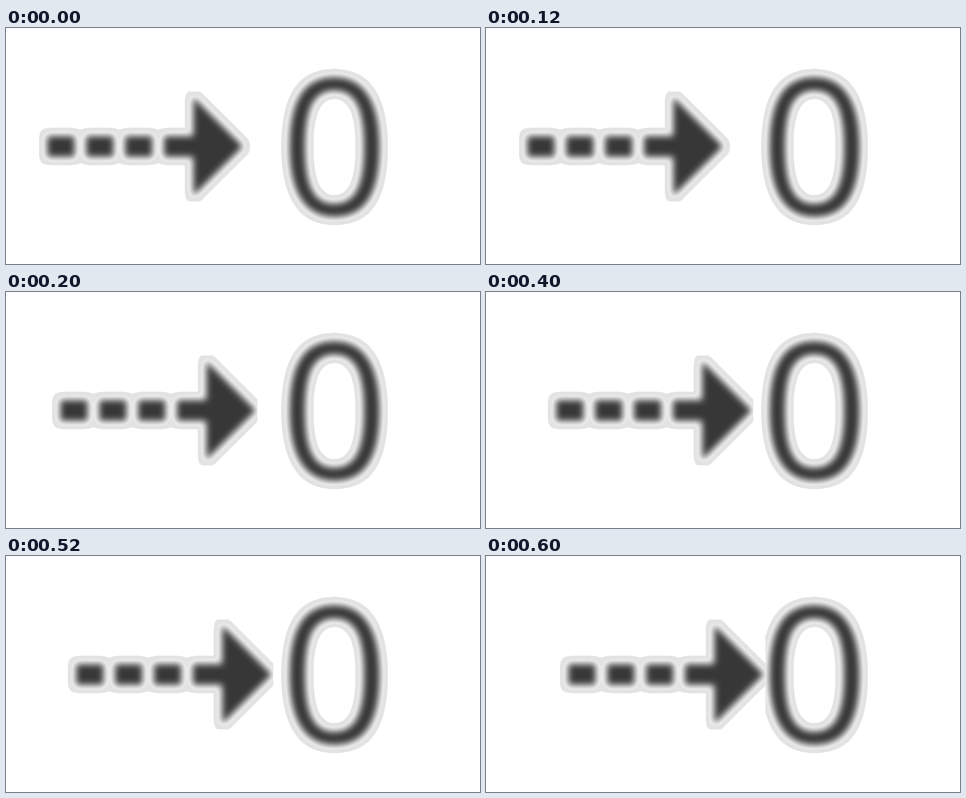
These frames come from a looping animation (1018 by 509 pixels, 800 ms). An HTML page with a canvas:

```html
<!DOCTYPE html>
<html lang="en">
<head>
<meta charset="utf-8">
<title>Arrow to zero</title>
<style>
  html, body { margin: 0; width: 100%; height: 100%; overflow: hidden; background: #fff; }
  canvas { display: block; }
</style>
</head>
<body>
<canvas id="stage" width="1018" height="509"></canvas>
<script>
const W = 1018, H = 509, STEP = 200;
const RADII = [7, 6, 7];
const EDGE = 0.0025, RIM = 0.07;
const HALO = 0xe3, GLOW = 0xe9, INK = 0x37;
const MID = 255.5;

// Arrow offset and right limit of each pose
const POSES = [
  { dx: 0, right: 540 },
  { dx: 28, right: 540 },
  { dx: 62, right: 574 },
  { dx: 88, right: 600 }
];

function makeCanvas() {
  const c = document.createElement('canvas');
  c.width = W;
  c.height = H;
  return c;
}

// Running-sum box blur of one row or column
function blurLine(src, dst, start, stride, count, r) {
  const at = i => (i < 0 || i >= count ? 0 : src[start + i * stride]);
  let sum = 0;
  for (let i = 0; i < r; i++) sum += at(i);
  for (let i = 0; i < count; i++) {
    sum += at(i + r) - at(i - r - 1);
    dst[start + i * stride] = sum / (2 * r + 1);
  }
}

function blur(a) {
  const b = new Float64Array(a.length);
  for (const r of RADII) {
    for (let y = 0; y < H; y++) blurLine(a, b, y * W, 1, W, r);
    for (let x = 0; x < W; x++) blurLine(b, a, x, W, H, r);
  }
  return a;
}

function shade(a) {
  return a < RIM ? HALO : Math.min(GLOW, 255 - (255 - INK) * a);
}

// Soft dark shape on a hard-edged light halo
function soften(draw) {
  const c = makeCanvas(), g = c.getContext('2d');
  draw(g);
  const img = g.getImageData(0, 0, W, H), px = img.data;
  const alpha = new Float64Array(W * H);
  for (let i = 0; i < alpha.length; i++) alpha[i] = px[i * 4 + 3] / 255;
  blur(alpha).forEach((a, i) => {
    const p = i * 4;
    px[p] = px[p + 1] = px[p + 2] = shade(a);
    px[p + 3] = a > EDGE ? 255 : 0;
  });
  g.putImageData(img, 0, 0);
  return c;
}

function drawArrow(g) {
  const left = 88.5, pitch = 83.5, dash = 59, half = 22.5;
  const neck = 402, tip = 509, stem = left + 3 * pitch;
  for (let i = 0; i < 3; i++) g.fillRect(left + i * pitch, MID - half, dash, half * 2);
  g.fillRect(stem, MID - half, neck + 1 - stem, half * 2);
  g.beginPath();
  g.moveTo(neck, MID - (tip - neck));
  g.lineTo(tip, MID);
  g.lineTo(neck, MID + (tip - neck));
  g.fill();
}

function drawZero(g) {
  g.font = '410px "Open Sans", "Noto Sans", sans-serif';
  g.fillText('0', 588.5, 403.4);
}

const arrow = soften(drawArrow);
const zero = soften(drawZero);
const ctx = document.getElementById('stage').getContext('2d');
let shown = -1;

function render(n) {
  const { dx, right } = POSES[n];
  ctx.fillStyle = '#fff';
  ctx.fillRect(0, 0, W, H);
  ctx.drawImage(zero, 0, 0);
  ctx.save();
  ctx.beginPath();
  ctx.rect(0, 137, right, 237);
  ctx.clip();
  ctx.fillRect(0, 137, right, 237);
  ctx.drawImage(arrow, dx, 0);
  ctx.restore();
}

const began = performance.now();
function tick() {
  const n = Math.floor((performance.now() - began) / STEP) % POSES.length;
  if (n !== shown) render(shown = n);
  requestAnimationFrame(tick);
}
tick();
</script>
</body>
</html>
```
